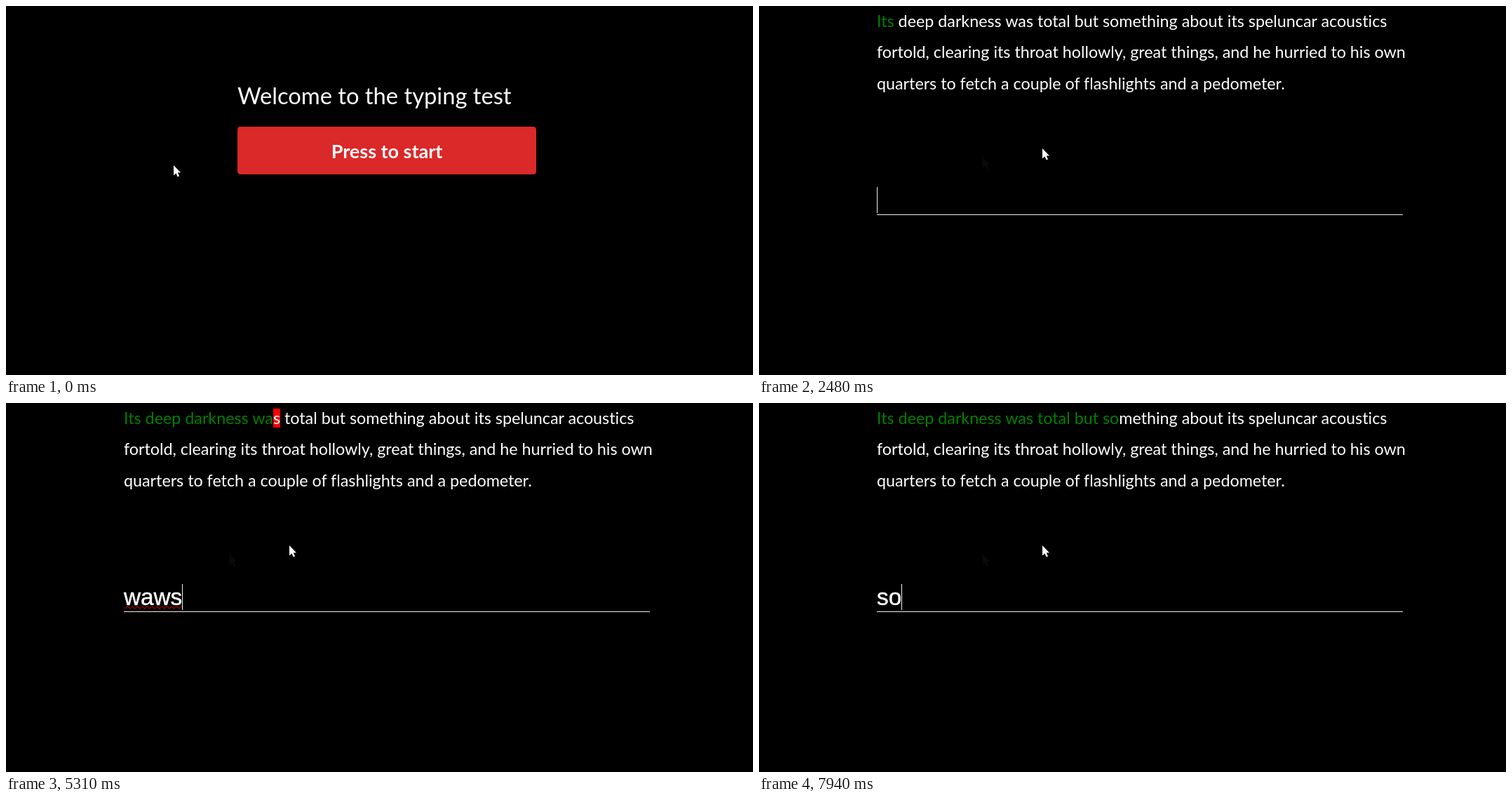
Recreate the animation shown at these times as an HTML page. Size 1065 by 526 pixels, loop 8000 ms.

```html
<!DOCTYPE html>
<html lang="en">
<head>
<meta charset="utf-8">
<title>Typing test</title>
<style>
  html, body { margin: 0; width: 100%; height: 100%; overflow: hidden; background: #000; }
  #stage { position: relative; width: 1065px; height: 526px; overflow: hidden; color: #fff; font-family: Lato, sans-serif; }
  #stage > *, #intro > *, #test > * { position: absolute; }
  [hidden] { display: none; }
  #title { left: 330px; top: 108px; font-size: 32.7px; line-height: 40px; white-space: nowrap; }
  #start {
    left: 330px; top: 172px; width: 426px; height: 68px; border-radius: 4.4px;
    background: #db2828; font: bold 27px/70px Lato, sans-serif; text-align: center;
  }
  #quote {
    left: 168px; top: -1px; font-size: 23.3px; line-height: 44.4px; white-space: pre;
    font-variant-ligatures: none;
  }
  #good { color: #008000; }
  #bad { background: linear-gradient(#f00, #f00) 0 100% / 100% 27px no-repeat; }
  #field {
    left: 168px; top: 258px; width: 750px; height: 39px;
    font: 33.3px/37px "Liberation Sans", Arial, sans-serif; white-space: pre;
    -webkit-text-stroke: 0.5px #fff;
  }
  #rule { left: 168px; top: 297px; width: 750px; height: 1px; background: #eee; }
  #caret { display: inline-block; width: 1px; height: 37px; vertical-align: top; background: #eee; }
  .misspelt { text-decoration: underline wavy #f00 1px; text-underline-offset: 1px; text-decoration-skip-ink: none; }
  svg { left: 0; top: 0; width: 1065px; height: 526px; }
</style>
</head>
<body>
<div id="stage">
  <div id="intro">
    <div id="title">Welcome to the typing test</div>
    <div id="start">Press to start</div>
  </div>
  <div id="test" hidden>
    <div id="quote"><span id="good"></span><span id="bad"></span><span id="rest"></span></div>
    <div id="field"><span id="typed"></span><span id="caret"></span></div>
    <div id="rule"></div>
  </div>
  <svg>
    <defs>
      <path id="arrow" d="M0 0V14.6L3.4 11.5 5.7 16.6 8 15.6 5.8 10.6H10Z"/>
      <path id="hand" stroke="#000" d="M-1.5 1.5Q0 -1 1.5 1.5V7L9 8.5Q11 9 11 11V15L9 20H0L-5.5 12.5Q-5 10.5 -3.5 10L-1.5 12Z"/>
    </defs>
    <use id="trail" href="#arrow" fill="#0b0909" transform="translate(318.5 215) scale(1.08)"/>
    <use id="pointer" href="#arrow" fill="#fff"/>
  </svg>
</div>
<script>
const LOOP = 8000, OPEN = 530;
const TEXT = `Its deep darkness was total but something about its speluncar acoustics
fortold, clearing its throat hollowly, great things, and he hurried to his own
quarters to fetch a couple of flashlights and a pedometer.`;

// time, pointer x, pointer y
const MOVES = [[0, 239, 227], [150, 266, 224], [230, 318, 215], [300, 377, 206], [380, 404, 203]];

// time, start of the current word, field content
const KEYS = [
  [0, 0, ""], [1780, 0, "I"], [2180, 0, "It"], [2330, 0, "Its"],
  [2480, 4, ""], [2710, 4, "s"], [2860, 4, ""], [3110, 4, "d"], [3260, 4, "de"], [3410, 4, "dee"], [3570, 4, "deep"],
  [3720, 9, ""], [3870, 9, "d"], [4030, 9, "dar"], [4200, 9, "dark"], [4370, 9, "darkn"], [4450, 9, "darkne"],
  [4600, 9, "darknes"], [4720, 9, "darkness"],
  [4840, 18, ""], [4950, 18, "w"], [5070, 18, "wa"], [5190, 18, "waw"], [5310, 18, "waws"],
  [5620, 18, "waw"], [5770, 18, "wa"], [6170, 18, "was"],
  [6320, 22, ""], [6400, 22, "t"], [6550, 22, "to"], [6660, 22, "tot"], [6780, 22, "total"],
  [7240, 28, ""], [7390, 28, "b"], [7470, 28, "bu"], [7620, 28, "but"],
  [7700, 32, ""], [7850, 32, "s"], [7940, 32, "so"]
];

const $ = id => document.getElementById(id);
const latest = (list, t) => list.findLast(row => row[0] <= t);

function drawPointer(t) {
  const [, x, y] = latest(MOVES, t);
  const over = t >= 300 && t < OPEN;
  $("pointer").setAttribute("transform", `translate(${x} ${y})`);
  $("pointer").setAttribute("href", over ? "#hand" : "#arrow");
  $("trail").style.display = t >= OPEN ? "" : "none";
  $("start").style.background = !over ? "#db2828" : t < 450 ? "#d01919" : "#b21e1e";
}

let shown;
function drawTyping(row) {
  if (row === shown) return;
  shown = row;
  const [, start, typed] = row;
  const word = TEXT.slice(start).split(/\s/)[0];
  let ok = 0;
  while (ok < typed.length && typed[ok] === word[ok]) ok++;
  const good = start + ok;
  const bad = Math.max(good, start + Math.min(typed.length, word.length));
  $("good").textContent = TEXT.slice(0, good);
  $("bad").textContent = TEXT.slice(good, bad);
  $("rest").textContent = TEXT.slice(bad);
  $("typed").textContent = typed;
  $("typed").className = typed.length > word.length ? "misspelt" : "";
}

function frame(now) {
  const t = now % LOOP;
  $("intro").hidden = t >= OPEN;
  $("test").hidden = t < OPEN;
  drawPointer(t);
  drawTyping(latest(KEYS, t));
  $("caret").style.visibility = t >= 1080 && t < 1630 ? "hidden" : "visible";
  requestAnimationFrame(frame);
}
frame(performance.now());
</script>
</body>
</html>
```
